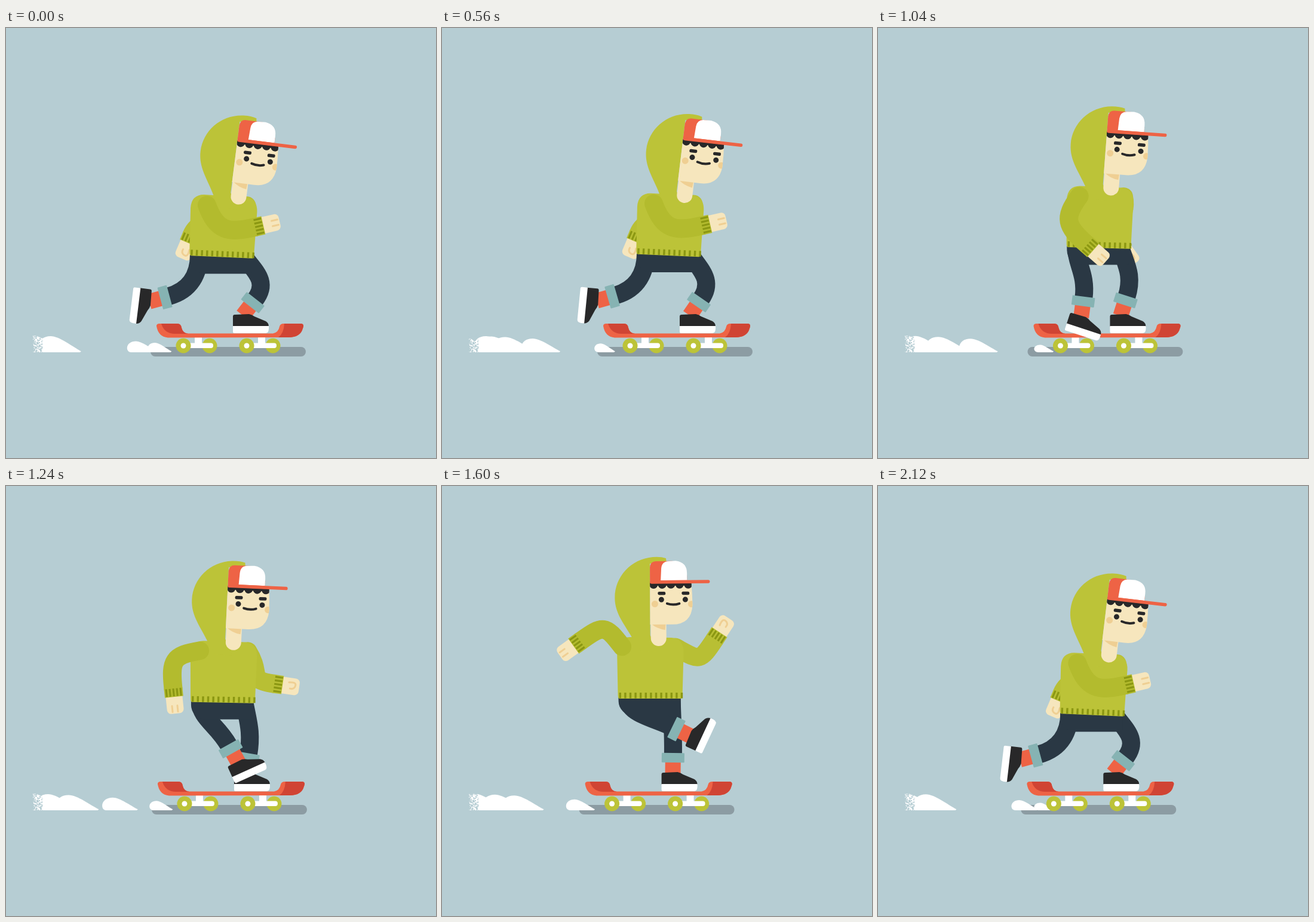
Recreate the animation shown at these times as an HTML page with a canvas. Size 720x720 px, loop 2.16 s.

```html
<!DOCTYPE html>
<html lang="en">
<head>
<meta charset="utf-8">
<title>Skater</title>
<style>
html, body { margin: 0; height: 100%; overflow: hidden; background: #b6cdd3; }
canvas { display: block; width: 100vw; height: 100vh; }
</style>
</head>
<body>
<canvas id="stage" width="720" height="720"></canvas>
<script>
const ctx = document.getElementById('stage').getContext('2d');
const LOOP = 2160, STEP = 40, RAD = Math.PI / 180;
const BG = '#b6cdd3', GREEN = '#bcc338', ARM = '#b3bb2e', FAR_ARM = '#b8bf34', RIB = '#8b9712',
  SKIN = '#f6e6bd', BLUSH = '#efcf93', RED = '#ee6345', DARK_RED = '#d04434', NAVY = '#2a3844',
  TEAL = '#86b3b3', BLACK = '#282829', WHITE = '#fff', SHADOW = '#8c9ca3';

const mix = (a, b, s) => a + (b - a) * s;
const ramp = (t, a, b) => Math.min(1, Math.max(0, (t - a) / (b - a)));
const ease = (t, a, b) => { const u = ramp(t, a, b); return u * u * (3 - 2 * u); };
// 0 at rest, rising over a..b and falling back over c..d.
const swing = (t, a, b, c, d) => ease(t, a, b) * (1 - ease(t, c, d));
const go = ([x, y], deg, d) => [x + d * Math.cos(deg * RAD), y + d * Math.sin(deg * RAD)];

// A push shoots the board forward, then it slowly drifts back.
function boardShift(t) {
  const q = (t + LOOP - 1860) % LOOP;
  return q < 860 ? 17 - 42.5 * (1 - q / 860) ** 2 : 17 - 42.5 * ((q - 860) / 1300) ** 1.5;
}

// Times when dust puffs leave the board.
const PUFFS = [-140, -75, 60, 245, 515, 735, 1005, 1170, 1470];

let seed = 7;
const rnd = () => (seed = seed * 16807 % 2147483647) / 2147483647;
const specks = Array.from({ length: 190 }, () => [44 + 18 * rnd() ** 2, 512 + 32 * rnd(), 0.5 + 0.8 * rnd()]);

function fill(color, d) { ctx.fillStyle = color; ctx.fill(new Path2D(d)); }
function box(color, x, y, w, h, r = 0) {
  ctx.fillStyle = color;
  ctx.beginPath();
  ctx.roundRect(x, y, w, h, r);
  ctx.fill();
}
function dot(color, x, y, r) {
  ctx.fillStyle = color;
  ctx.beginPath();
  ctx.arc(x, y, r, 0, 7);
  ctx.fill();
}
function line(color, width, d, cap = 'round') {
  ctx.strokeStyle = color;
  ctx.lineWidth = width;
  ctx.lineCap = cap;
  ctx.stroke(new Path2D(d));
}
function at(x, y, deg, draw) {
  ctx.save();
  ctx.translate(x, y);
  ctx.rotate(deg * RAD);
  draw();
  ctx.restore();
}
const limb = (color, width, a, b, c, d, cap) => line(color, width, `M${a}C${b} ${c} ${d}`, cap);

function dust(t) {
  for (const birth of PUFFS) {
    const age = (t - birth + LOOP) % LOOP;
    if (age > 1300) continue;
    const x = 285 * Math.exp(-age / 410), tip = 50 + 260 * Math.exp(-age / 560), w = tip - x;
    const h = (12.5 + 16 * (1 - Math.exp(-age / 300))) * Math.min(1, age / 40), y = 543 - h;
    fill(WHITE, `M${x + 7},543C${x - 3},543 ${x - 3},${y} ${x + w * 0.3},${y}
      C${x + w * 0.5},${y} ${x + w * 0.8},${543 - h * 0.35} ${tip},541.5L${tip - 2},543Z`);
  }
  box(BG, 0, 505, 45, 40);
  for (const s of specks) dot(BG, ...s);
}

function board() {
  for (const x of [298, 404]) {
    dot(GREEN, x + 44, 532, 12.5);
    box(WHITE, x + 19, 516, 12, 14);
    box(WHITE, x, 527.5, 50, 8.5, 4);
    dot(GREEN, x, 532, 12.5);
    dot(WHITE, x, 532, 4.5);
  }
  const rightEnd = 'L496,495Q501,496 498,503Q494,518 474,518';
  fill(RED, `M253,499Q253,495 258,495L288,495Q294,495 295,502Q297,511 306,511.5
    L448,511.5Q457,510 459,500Q460,495 466,495${rightEnd}L272,518.5Q256,517 253,499Z`);
  fill(DARK_RED, 'M261,495L288,495Q294,495 295,502Q297,511 306,512L284,512Q266,512 261,495Z');
  fill(DARK_RED, `M467,495${rightEnd}L457,518Q466,512 467,495Z`);
}

function leg(hip, bend, ankle, shank, shoe) {
  const end = go(ankle, shank, 29);
  limb(NAVY, 30, hip, bend, go(end, shank, 40), end, 'butt');
  at(...ankle, shank, () => {
    box(RED, -4, -13, 22, 26);
    box(TEAL, 15, -19, 16, 38, 1);
  });
  at(...ankle, shoe, () => {
    fill(BLACK, 'M-19,5Q-19,2 -16,2L8,1Q13,2 17,5L36,13Q41,16 41,22L-19,22Z');
    fill(WHITE, 'M-19,21L41,21Q42,33 36,33L-17,33Q-19,33 -19,30Z');
  });
}

function arm(color, shoulder, dir, wrist, hand, fingers) {
  limb(color, 31, shoulder, go(shoulder, dir, 46), go(wrist, hand, -46), wrist);
  at(...wrist, hand, () => {
    box(SKIN, 12, -14, 31, 28, [0, 7, 7, 0]);
    line(BLUSH, 3, fingers);
    box(color, 0, -15.5, 15, 31);
    for (let y = -12; y <= 12; y += 6) box(RIB, 1, y - 1.6, 13, 3.2);
  });
}

function torso() {
  fill(GREEN, `M-54,-6L-55.5,-80Q-55,-102 -34,-103L36,-102Q56,-100 56,-78L54,-6
    Q54,0 51,0L-51,0Q-54,0 -54,-6Z`);
  for (let i = 0; i < 13; i++) box(RIB, -52 + i * 8.6, -10, 3.4, 9.5);
}

function head() {
  ctx.translate(-361, -267);
  fill(GREEN, `M375,130L374,121Q365,118 352,119C315,122 288,152 288,187
    C288,215 306,233 319,258L332,277L360,277L347,250L347,130Z`);
  box(SKIN, 348, 222, 26, 46, [0, 0, 13, 13]);
  fill(BLUSH, 'M349,231L373,231L372,241Q358,239 349,231Z');
  ctx.save();
  const face = 'M347,161L416,161Q418,180 418,200Q416,232 384,232L347,232Z';
  fill(SKIN, face);
  ctx.clip(new Path2D(face));
  dot(BLUSH, 355, 197.5, 5.5);
  dot(BLUSH, 416, 198, 5.5);
  box(BLACK, 347, 160, 70, 7);
  for (let i = 0; i < 5; i++) dot(BLACK, 353 + i * 14.5, 165, 7);
  ctx.restore();
  for (const x of [366, 406]) {
    box(BLACK, x - 6, 177, 13, 5.5, 2.5);
    dot(BLACK, x, 190.3, 4.5);
  }
  line(BLACK, 4, 'M375.5,197Q386,200.5 396,197');
  fill(RED, 'M347,163L347,136Q348,126 357,126L385,126L409,150L409,163Z');
  fill(WHITE, 'M365,158L366,138Q367,126 379,126L390,125.5Q409,128 409,146L409,158Z');
  line(RED, 5.5, 'M350,161L444.5,160.5');
}

function draw(t) {
  const shift = boardShift(t);
  const lift = swing(t, 300, 1710, 1690, 1920);
  const arms = swing(t, 600, 1740, 1710, 2110);
  const kick = swing(t, 500, 1600, 1760, 2130);
  const tilt = mix(7.3, -2.7, ramp(t, 400, 1840) ** 1.5 * (1 - ease(t, 1840, 2160)));
  const x = 362 + shift, y = mix(383.5, 355.5, lift);
  const rel = (dx, dy) => [x + dx, y + dy];

  ctx.fillStyle = BG;
  ctx.fillRect(0, 0, 720, 720);
  box(SHADOW, 243 + shift, 534, 260, 16, 8);
  dust(t);
  at(shift, 0, 0, board);

  const farShoulder = rel(42, -86);
  const farWrist = go(farShoulder, mix(152, -18, arms), 67 + 37 * (1 - arms) ** 3);
  arm(FAR_ARM, farShoulder, mix(105, 25, arms), farWrist, mix(113, -64, arms),
    'M25,-6Q39,-9 36,0Q34,5 28,4');

  const hip = rel(36, -3), lean = 38 * (1 - lift);
  leg(hip, go(hip, 90 - lean * 0.9, 30), [400 + shift, 478], lean - 90, 0);

  // The free leg swings about the hip and stretches while it pushes.
  const joint = rel(-38, -3), stretch = 15 * Math.sin(Math.PI * ease(t, 1760, 2130)) ** 2;
  const ankle = go(joint, mix(136, 32, kick), mix(110, 121, kick) + stretch);
  leg(joint, rel(-38, 26), ankle, mix(-15, -154, kick), mix(97, -65, kick));
  box(NAVY, x - 53, y - 6, 104, 34, [0, 0, 4, 24]);

  at(x, y, 0.35 * Math.max(0, tilt), torso);
  at(...rel(mix(27, 14, swing(t, 300, 1700, 1710, 2110)), -89), tilt, head);

  const shoulder = rel(mix(-24.5, -48, arms), -87);
  const wrist = go(shoulder, mix(25, 195, arms), mix(88, 69, arms));
  arm(ARM, shoulder, mix(70, 240, arms), wrist, mix(-13, 151, arms), 'M30,-4L40,-4M30,5L40,5');
}

function frame() {
  draw(Math.floor(performance.now() % LOOP / STEP) * STEP);
  requestAnimationFrame(frame);
}
frame();
</script>
</body>
</html>
```
